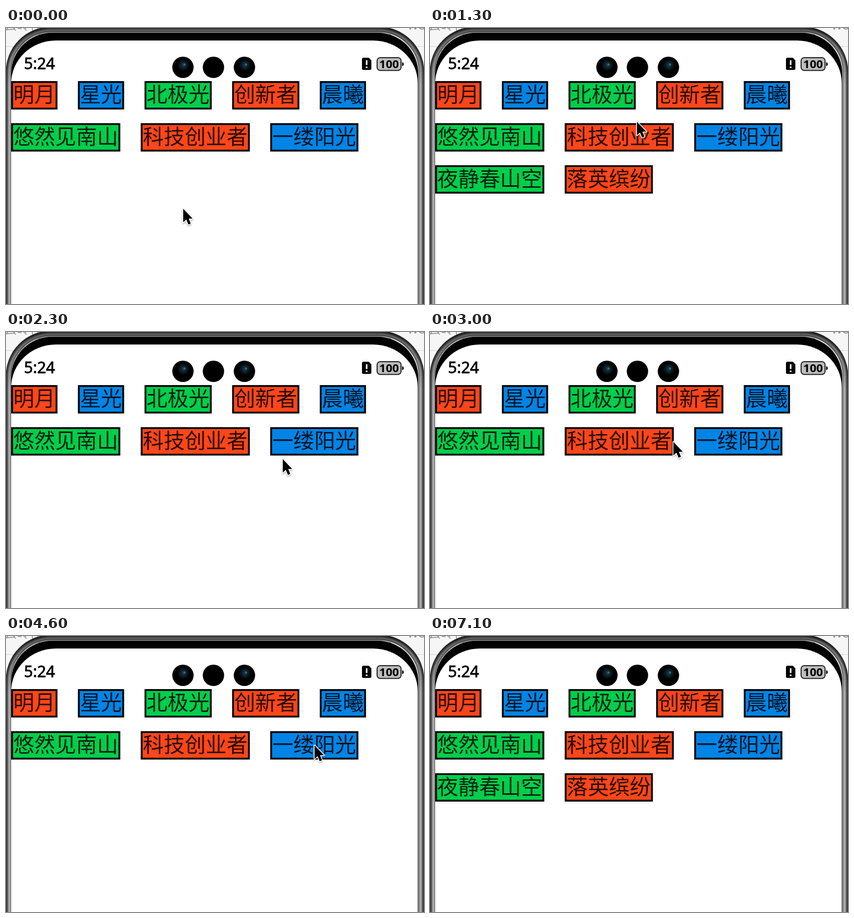
Recreate the animation shown at these times as an HTML page. Size 802x530 px, loop 7300 ms.

```html
<!DOCTYPE html>
<html lang="zh-CN">
<head>
<meta charset="utf-8">
<style>
  html, body { margin: 0; width: 100%; height: 100%; overflow: hidden; background: #f6f6f6; }
  svg { display: block; width: 802px; height: 530px; }
  .tag text { font: 40.2px "Noto Sans CJK SC", "Noto Sans CJK", sans-serif; fill: #000; fill-opacity: .85; }
  .status { font-family: "Noto Sans", "Open Sans", sans-serif; fill: #000; }
  .behind { font: 24px "Noto Sans CJK SC", "Noto Sans CJK", sans-serif; fill: #999; }
</style>
</head>
<body>
<svg id="stage" viewBox="0 0 802 530">
  <defs>
    <radialGradient id="lens">
      <stop offset="0" stop-color="#1d4250"/>
      <stop offset=".45" stop-color="#0d222d"/>
      <stop offset="1" stop-color="#000"/>
    </radialGradient>
    <linearGradient id="topShade" gradientUnits="userSpaceOnUse" x1="0" y1="0" x2="0" y2="110">
      <stop offset="0" stop-opacity=".5"/>
      <stop offset="1" stop-opacity="0"/>
    </linearGradient>
    <filter id="shadow" x="-50%" y="-30%" width="200%" height="180%">
      <feDropShadow dx="0" dy="1.5" stdDeviation="1.5" flood-opacity=".4"/>
    </filter>
  </defs>

  <g id="behind">
    <text class="behind" x="-3" y="3">云岭社</text>
    <text class="behind" x="770" y="3">WS</text>
    <path d="M0 35.5H802" stroke="#d2d2d2"/>
  </g>

  <g id="bezel" fill="none"></g>
  <rect x="5" y="3" width="792" height="700" rx="81" fill="none" stroke="url(#topShade)" stroke-width="10"/>
  <rect x="10" y="9" width="781" height="700" rx="78" fill="#000"/>
  <rect x="10" y="24" width="780" height="700" rx="86" ry="82" fill="#fff"/>

  <text class="status" x="34.5" y="79" font-size="30" stroke="#000" stroke-width=".8">5:24</text>
  <g id="cameras"></g>

  <path d="M686 57H696L701 62V78Q701 80.500 698.500 80.500H686Q683 80.500 683 78V60Q683 57 686 57Z"/>
  <path d="M692 62V71M692 74V77" stroke="#fff" stroke-width="3"/>
  <rect x="712" y="57" width="46" height="24.500" rx="6" fill="#bdbdbd" stroke="#222" stroke-width="2"/>
  <path d="M760 66Q763 66 763 69.500T760 73Z"/>
  <text class="status" x="735" y="77" font-size="22" font-weight="700" text-anchor="middle">100</text>

  <g id="tags"></g>
  <g id="cursor" filter="url(#shadow)">
    <path d="M1 2V28L6.800 22.800L11 32.500L15.500 30.500L11.500 21H19Z"
      stroke="#fff" stroke-width="3" stroke-linejoin="round" paint-order="stroke"/>
  </g>
</svg>
<script>
const LOOP = 7300, STEP = 100;
const RED = '#ff4618', GREEN = '#00cf4b', BLUE = '#0085e6';
const rows = [
  [['明月', RED], ['星光', BLUE], ['北极光', GREEN], ['创新者', RED], ['晨曦', BLUE]],
  [['悠然见南山', GREEN], ['科技创业者', RED], ['一缕阳光', BLUE]],
  [['夜静春山空', GREEN], ['落英缤纷', RED]],
];
const toggles = [1200, 2300, 3400, 4400, 5200];
const moves = [
  { from: 100, to: 900, a: [339, 345], b: [396, 178] },
  { from: 1400, to: 2200, a: [396, 178], b: [530, 242] },
  { from: 2300, to: 3000, a: [530, 242], b: [466, 209] },
  { from: 3400, to: 4100, a: [466, 209], b: [591, 208] },
];
const CURSOR_GONE = 6400;

const byId = id => document.getElementById(id);
function add(parent, name, attrs, text) {
  const node = document.createElementNS('http://www.w3.org/2000/svg', name);
  for (const key in attrs) node.setAttribute(key, attrs[key]);
  if (text) node.textContent = text;
  return parent.appendChild(node);
}

// Metal edge: nested outlines that brighten towards the screen.
for (let i = 0; i < 10; i++) {
  const shade = Math.round(55 + 125 * Math.exp(-(((i - 6.5) / 3.2) ** 2)));
  add(byId('bezel'), 'rect', {
    x: i + .5, y: i - 1.5, width: 801 - 2 * i, height: 700, rx: 86 - i,
    stroke: `rgb(${shade},${shade},${shade})`, 'stroke-width': 2,
  });
}

for (const x of [339.5, 398, 457.5]) {
  add(byId('cameras'), 'circle', { cx: x, cy: 75.5, r: 20.5, fill: '#000' });
  if (x === 398) continue;
  add(byId('cameras'), 'circle', { cx: x + 1, cy: 71, r: 12, fill: 'url(#lens)' });
  add(byId('cameras'), 'circle', { cx: x + 3, cy: 70, r: 2, fill: '#3f7182' });
}

const rowGroups = rows.map((tags, r) => {
  const group = add(byId('tags'), 'g', { class: 'tag' });
  const y = 102 + r * 80.75;
  let x = 10;
  for (const [label, fill] of tags) {
    const width = label.length * 40.2 + 8.3;
    add(group, 'rect', {
      x: x + 1.75, y: y + 1.75, width: width - 3.5, height: 51,
      fill, stroke: '#000', 'stroke-width': 3.5,
    });
    add(group, 'text', { x: x + 4, y: y + 40 }, label);
    x += width + 39.2;
  }
  return group;
});

const smooth = p => p * p * (3 - 2 * p);

function cursorAt(t) {
  const move = moves.filter(m => t >= m.from).pop() || moves[0];
  const p = smooth(Math.min(1, Math.max(0, (t - move.from) / (move.to - move.from))));
  return move.a.map((v, i) => Math.round(v + (move.b[i] - v) * p));
}

function render(time) {
  const t = Math.floor((time % LOOP) / STEP) * STEP;
  const lastRowShown = toggles.filter(at => t >= at).length % 2 === 1;
  rowGroups[2].setAttribute('visibility', lastRowShown ? 'visible' : 'hidden');
  byId('cursor').setAttribute('transform', `translate(${cursorAt(t)})`);
  byId('cursor').setAttribute('visibility', t < CURSOR_GONE ? 'visible' : 'hidden');
}

const start = performance.now();
function tick() {
  render(performance.now() - start);
  requestAnimationFrame(tick);
}
tick();
</script>
</body>
</html>
```
